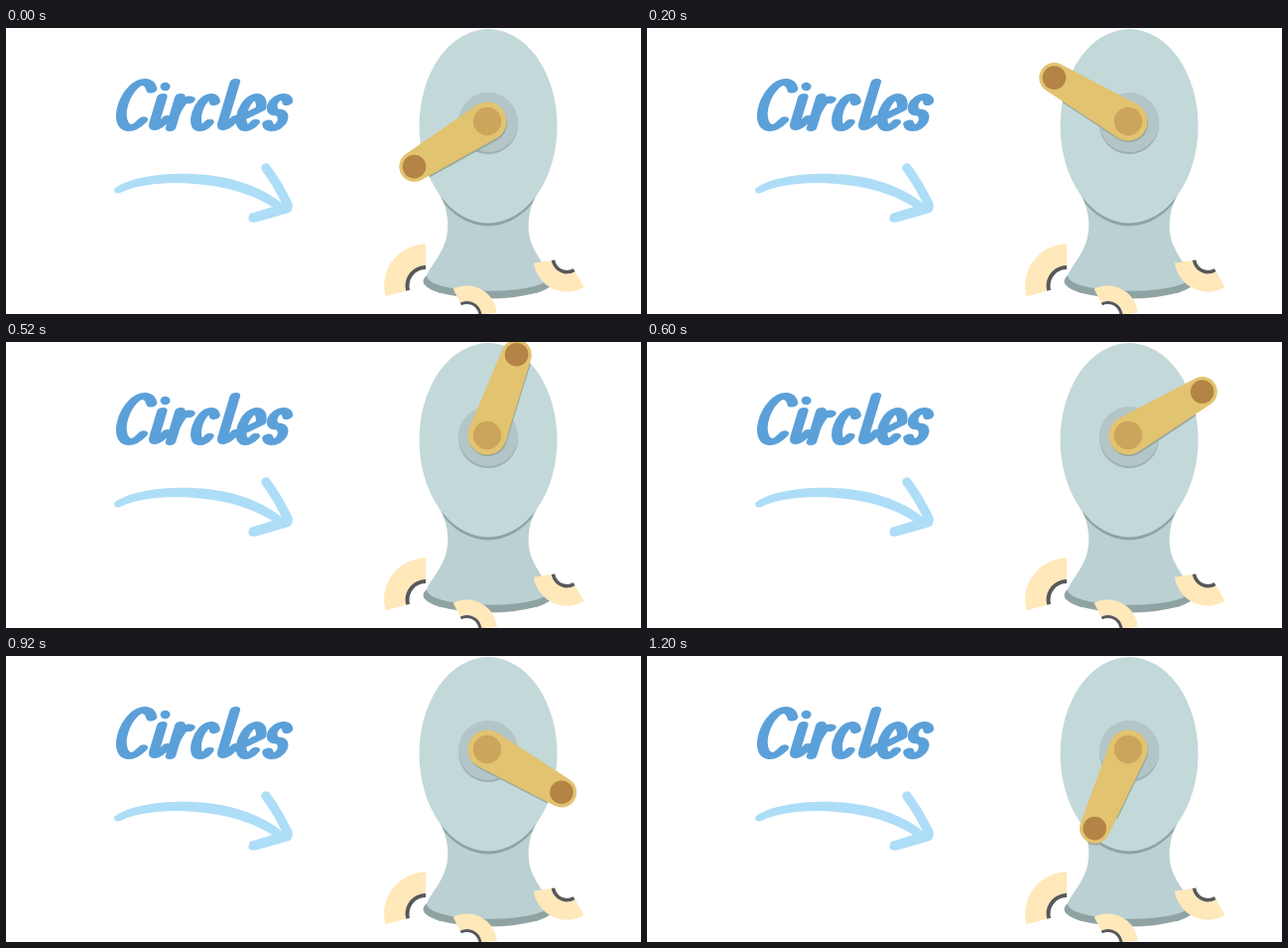
An HTML page with a canvas for the animation above (1.4 s loop, 640 by 288 pixels).

```html
<!DOCTYPE html>
<html lang="en">
<head>
<meta charset="utf-8">
<title>Circles</title>
<style>
  html, body { margin: 0; width: 100%; height: 100%; overflow: hidden; background: #fff; }
  canvas { display: block; width: 640px; height: 288px; }
</style>
</head>
<body>
<canvas id="stage" width="640" height="288" role="img" aria-label="Circles: an arrow points to a machine with a turning crank"></canvas>
<script>
const ctx = document.getElementById('stage').getContext('2d');
const TAU = Math.PI * 2;
const rad = deg => deg * Math.PI / 180;

const BLUE = '#5ba0d9', SKY = '#aeddf8', SHADE = '#90a3a3';
const STEP = 200;
const POSES = [148.2, 210.5, 290, 329.5, 30, 70, 113];
const PIVOT = { x: 485, y: 94 };
const ARM = { length: 86.5, big: 19.5, small: 15.2 };

function fill(path, color) {
  ctx.fillStyle = color;
  ctx.fill(path);
}

function oval(x, y, rx, ry = rx) {
  const p = new Path2D();
  p.ellipse(x, y, rx, ry, 0, 0, TAU);
  return p;
}

// Brush script: slanted bowls and stems, with y = 0 on the baseline.
const X_HEIGHT = 31, CAP_HEIGHT = 46;

function bowl(x, rx, height, from = -42, to = 42) {
  ctx.ellipse(x, -height / 2, rx, height / 2, 0, rad(from), rad(to), true);
}

function stem(x, height) {
  ctx.moveTo(x, -height);
  ctx.lineTo(x, -6);
  ctx.bezierCurveTo(x, 1, x + 5, 1, x + 11, -9);
}

function letterR(x) {
  ctx.moveTo(x, -X_HEIGHT);
  ctx.lineTo(x, 0);
  ctx.moveTo(x, -13);
  ctx.quadraticCurveTo(x + 3, -X_HEIGHT, x + 11, -X_HEIGHT + 3);
}

function letterE(x, rx) {
  ctx.moveTo(x - rx / 2, -12);
  bowl(x, rx, X_HEIGHT, -15);
}

function letterS(x, rx) {
  const r = X_HEIGHT / 4;
  ctx.ellipse(x, -3 * r, rx, r, 0, rad(-20), rad(100), true);
  ctx.ellipse(x, -r, rx, r, 0, rad(-80), rad(155));
}

const LETTERS = [
  () => bowl(125, 14, CAP_HEIGHT),
  () => stem(148, X_HEIGHT),
  () => letterR(166),
  () => bowl(196.5, 8.5, X_HEIGHT),
  () => stem(217, CAP_HEIGHT),
  () => letterE(242.5, 9),
  () => letterS(269, 7.5)
];

function drawTitle() {
  ctx.strokeStyle = BLUE;
  ctx.lineCap = ctx.lineJoin = 'round';
  ctx.lineWidth = 11;
  for (const trace of LETTERS) {
    ctx.save();
    ctx.transform(1, 0, -0.3, 1, 0, 100.5);
    ctx.beginPath();
    trace();
    ctx.restore();
    // A flattened, tilted nib varies the stroke width.
    ctx.save();
    ctx.rotate(rad(-15));
    ctx.scale(1, 0.6);
    ctx.stroke();
    ctx.restore();
  }
  fill(oval(160.5, 59, 5, 4.2), BLUE);
}

function drawArrow() {
  fill(new Path2D('M109 162C128 146 190 142 230 153C252 159 268 168 280 178L276 185'
    + 'C256 171 230 160 191 157C160 154 132 158 115 166Q109 168 109 162Z'), SKY);
  fill(new Path2D('M246 187L272 179L288 176Q290 184 285 186Q268 191 252 195.5Q241 197 246 187Z'), SKY);
  ctx.strokeStyle = SKY;
  ctx.lineWidth = 9.5;
  ctx.stroke(new Path2D('M262 141Q274 157 284 178'));
}

const head = oval(486, 98.7, 69.5, 97.7);
const neck = new Path2D('M435 164C446 180 449 205 440 222C435 233 428 240 424 249'
  + 'C424 270 549 270 549 249C544 240 537 233 532 222C523 205 526 180 537 164Z');
const machine = new Path2D(head);
machine.addPath(neck);

function drawMachine() {
  fill(oval(486, 255, 65.5, 17.5), SHADE);
  fill(neck, '#bbd0d2');
  ctx.save();
  ctx.clip(neck);
  fill(oval(486, 101.7, 69.5, 97.7), SHADE);
  ctx.restore();
  fill(head, '#c3d8d9');
  fill(oval(486, 97, 30), '#9db0b1');
  fill(oval(486, 95, 30), '#b3c5c6');
}

function drawPiece(x, y, outer, inner, line, from, to) {
  const a = rad(from), b = rad(to);
  const p = new Path2D();
  p.arc(x, y, outer, a, b);
  p.arc(x, y, inner, b, a, true);
  fill(p, '#ffe8b9');
  ctx.strokeStyle = '#58585a';
  ctx.lineWidth = line;
  ctx.lineCap = 'butt';
  ctx.beginPath();
  ctx.arc(x, y, inner - line / 2, a, b);
  ctx.stroke();
}

// Outline around two circles of different size.
function armPath(angle, tip) {
  const { length, big, small } = ARM;
  const side = Math.acos((big - small) / length);
  const p = new Path2D();
  p.arc(PIVOT.x, PIVOT.y, big, angle + side, angle - side + TAU);
  p.arc(tip.x, tip.y, small, angle - side, angle + side);
  p.closePath();
  return p;
}

function drawCrank(angle) {
  const tip = {
    x: PIVOT.x + ARM.length * Math.cos(angle),
    y: PIVOT.y + ARM.length * Math.sin(angle)
  };
  const arm = armPath(angle, tip);
  ctx.save();
  ctx.clip(machine);
  ctx.translate(0.6, 1.6);
  fill(arm, '#98a69d');
  ctx.restore();
  fill(arm, '#e2c370');
  fill(oval(PIVOT.x, PIVOT.y, 14.2), '#cba55b');
  fill(oval(tip.x, tip.y, 11.8), '#b48346');
}

function draw(now) {
  ctx.fillStyle = '#fff';
  ctx.fillRect(0, 0, 640, 288);
  drawTitle();
  drawArrow();
  drawMachine();
  drawPiece(423, 259.5, 42, 20.5, 4, 165, 270);
  drawPiece(464.5, 290, 30.5, 15, 3, 243, 354);
  drawPiece(565.5, 231.5, 34.2, 16, 3.6, 60, 171);
  drawCrank(rad(POSES[Math.floor(now / STEP) % POSES.length]));
}

const start = performance.now();
function loop() {
  draw(performance.now() - start);
  requestAnimationFrame(loop);
}
loop();
</script>
</body>
</html>
```
